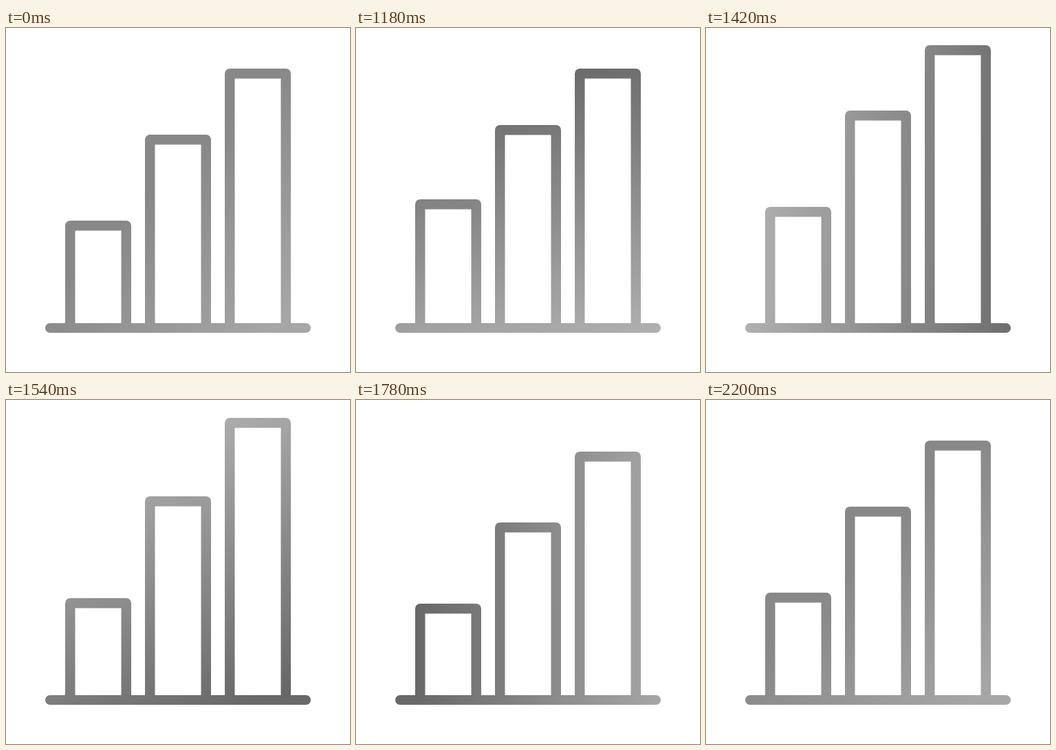
An HTML page with a canvas for the animation above (2230 ms loop, 500 px wide and 500 px high).

```html
<!DOCTYPE html>
<html lang="en">
<head>
<meta charset="utf-8">
<title>Bar chart</title>
<style>
  html, body { margin: 0; width: 100%; height: 100%; overflow: hidden; background: #fff; }
  canvas { display: block; }
</style>
</head>
<body>
<canvas id="stage" width="500" height="500"></canvas>
<script>
const ctx = document.getElementById('stage').getContext('2d');
const LOOP = 2230, START = 1000, STEP = 30;
const BARS = [
  { x: 93.25, top: 280, delay: 0 },
  { x: 209.25, top: 155, delay: 96 },
  { x: 325.25, top: 59, delay: 200 },
];
const BAR_WIDTH = 81.5, BASE_Y = 436;
const RISE = -35, DIP = 23.3;

const mix = (a, b, u) => a + (b - a) * u;
const progress = (t, from, to) => Math.min(1, Math.max(0, (t - from) / (to - from)));
const smooth = u => u * u * (3 - 2 * u);
const gray = v => `rgb(${v},${v},${v})`;

// Vertical offset of a bar's top: quick rise, overshoot below, settle.
function bounce(t) {
  if (t < 305) return RISE * smooth(1 - (1 - progress(t, 0, 285)) ** 1.6);
  if (t < 658) return mix(RISE, DIP, smooth(progress(t, 305, 658)));
  return mix(DIP, 0, smooth(progress(t, 658, 990)));
}

// Gray gradient that turns once clockwise and is softer at rest.
function shade(t) {
  const angle = Math.PI * (0.25 + 2 * smooth(progress(t, 0, 1000)));
  const contrast = t > 0 ? 1 - smooth(progress(t, 800, 1100)) : 0;
  const point = d => [285 + d * Math.cos(angle), 255 + d * Math.sin(angle)];
  const gradient = ctx.createLinearGradient(
    ...point(mix(-60, -200, contrast)), ...point(mix(200, 220, contrast)));
  gradient.addColorStop(0, gray(Math.round(mix(136, 104, contrast))));
  gradient.addColorStop(1, gray(Math.round(mix(166, 176, contrast))));
  return gradient;
}

function line(width, ...points) {
  ctx.lineWidth = width;
  ctx.beginPath();
  for (const [x, y] of points) ctx.lineTo(x, y);
  ctx.stroke();
}

function draw(now) {
  const elapsed = Math.max(0, now % LOOP - START);
  const t = Math.floor(elapsed / STEP) * STEP;
  ctx.clearRect(0, 0, 500, 500);
  ctx.strokeStyle = shade(t);
  ctx.lineJoin = 'round';
  ctx.lineCap = 'butt';
  for (const { x, top, delay } of BARS) {
    const y = Math.round(top + bounce(t - delay)) + 7.25;
    const right = x + BAR_WIDTH;
    line(14.5, [x, BASE_Y], [x, y], [right, y], [right, BASE_Y]);
  }
  ctx.lineCap = 'round';
  line(14, [64, BASE_Y], [436, BASE_Y]);
}

const begin = performance.now();
function tick() {
  draw(performance.now() - begin);
  requestAnimationFrame(tick);
}
tick();
</script>
</body>
</html>
```
